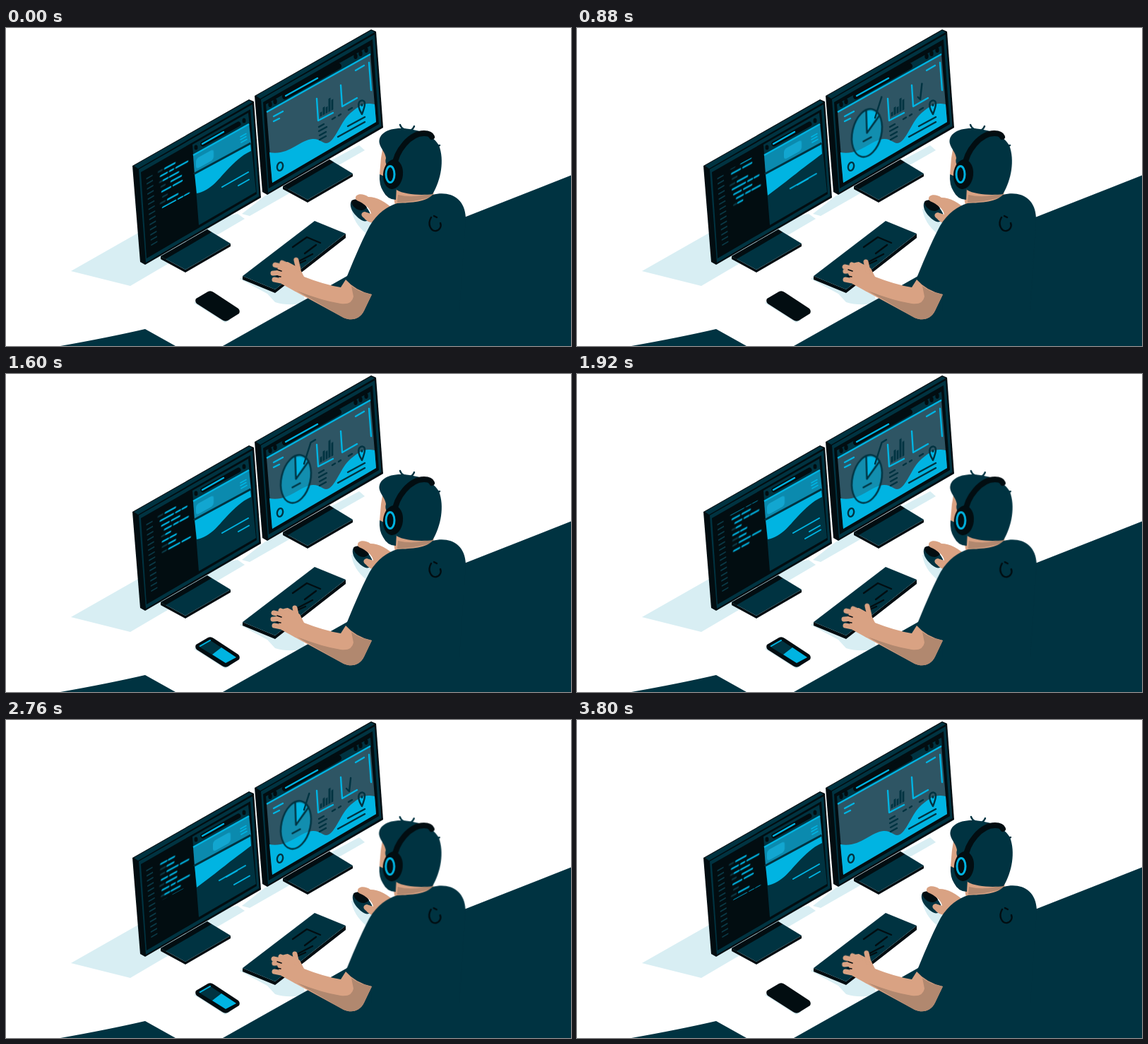
Write an HTML page without scripts that moves like this. It is 800 px wide and 450 px high and loops after 3840 ms.

```html
<!DOCTYPE html>
<html lang="en">
<head>
<meta charset="utf-8">
<title>Developer at a desk</title>
<style>
html, body { margin: 0; width: 100%; height: 100%; overflow: hidden; background: #fff; }
svg { display: block; width: 100vw; height: 100vh; }
svg * { animation: 3840ms linear infinite; }

.ink { fill: #020d11; }
.teal { fill: #003341; }
.cyan { fill: #00b4e2; }
.mid { fill: #0b8aae; }
.slate { fill: #2e5564; }
.shade { fill: #d8eef3; }
.skin { fill: #d9a283; }
.tan { fill: #b1886f; }
.line { fill: none; stroke: #003341; stroke-width: 2.4; stroke-linecap: round; stroke-linejoin: round; }
.line.bright { stroke: #00b4e2; }
.line.black { stroke: #020d11; }
.line.dim { stroke: #0a3a47; }

.code { animation-name: scroll; }
@keyframes scroll { to { transform: translate(-8px, -115px); } }

/* the hero banner runs twice per loop */
.hero, .trace { animation-duration: 1920ms; }
.hero { animation-timing-function: ease-in-out; }
.button { animation-name: button; }
@keyframes button {
  0%, 15%, 77%, 100% { transform: none; }
  40%, 68% { transform: translateX(24px); }
}
.title { animation-name: title; }
@keyframes title {
  0%, 15%, 77%, 100% { transform: none; }
  40% { transform: translate(-4px, 2px); }
  68% { transform: translate(-6px, 4px); }
}
.subtitle { animation-name: subtitle; }
@keyframes subtitle {
  0%, 15%, 77%, 100% { transform: none; }
  40%, 68% { transform: translate(-17px, -1px); }
}
.note { animation-name: note; }
@keyframes note {
  0%, 43%, 84%, 100% { opacity: 0; }
  47%, 80% { opacity: 1; }
}

.trace { stroke-dasharray: 27 70; animation-name: trace; }
@keyframes trace {
  0%, 29% { stroke-dashoffset: 28; }
  45% { stroke-dashoffset: 0; }
  67% { stroke-dashoffset: -27; }
  77% { stroke-dashoffset: -41; }
  84%, 100% { stroke-dashoffset: -48; }
}
.pie { animation-name: pie; animation-timing-function: ease-in-out; }
@keyframes pie {
  0%, 3% { transform: scale(0); }
  14%, 84% { transform: scale(1); }
  88.5% { transform: scale(.5); }
  93%, 100% { transform: scale(0); }
}
.pointer { stroke-dasharray: 40 60; animation-name: pointer; }
@keyframes pointer {
  0%, 12% { stroke-dashoffset: 41; }
  23% { stroke-dashoffset: 9; }
  30%, 66% { stroke-dashoffset: 0; }
  72% { stroke-dashoffset: 16; }
  78%, 100% { stroke-dashoffset: 41; }
}
.bars { transform-origin: 0 367px; animation-name: bars; animation-timing-function: ease-in-out; }
@keyframes bars {
  0%, 27%, 82%, 100% { transform: none; }
  50% { transform: scaleY(1.4); }
  70% { transform: scaleY(1.15); }
}

.phone { animation: phone 3840ms step-end infinite; }
@keyframes phone { 0%, 94% { opacity: 0; } 40% { opacity: 1; } }

.mouse { animation-name: mouse; animation-timing-function: ease-in-out; }
@keyframes mouse {
  0%, 6%, 87%, 100% { transform: translate(-3px, -1px); }
  18%, 74% { transform: none; }
}
.sway { animation-name: sway; animation-timing-function: ease-in-out; }
@keyframes sway {
  0%, 40%, 88%, 100% { transform: none; }
  20% { transform: translateX(-1px); }
  62% { transform: translate(-.5px, .3px); }
}
.tap { animation: tap 480ms ease-in-out infinite; }
.tap.late { animation-delay: -360ms; }
@keyframes tap { 0%, 55%, 100% { transform: none; } 80% { transform: translate(2px, -3px); } }
</style>
</head>
<body>
<svg viewBox="0 0 800 450">
<defs>
  <clipPath id="codeView"><path d="M-8 198H45V256H-8Z"/></clipPath>
  <g id="rows">
    <path class="line dim" d="M-4 201.500h5M-2 217h5M0 224.500h5M2 240h6M-1 247.500h6M4 278h5M5 293.500h6M5 301h5"/>
    <path class="line bright" d="M5 201.500h14M-1 209h9M12 209h5M21 209h16M3 217h6M12 217h12M14 224.500h14M1 232h12M17 232h12M9 247.500h14M2 255h18M24 255h6M33 255h6M4 263h10M18 263h11M8 270.500h9M21 270.500h6M30 270.500h11M10 278h6M5 286h8M16 286h8M14 293.500h9M14 301h15M33 301h11M6 309h8M18 309h9"/>
  </g>
  <g id="stand">
    <path class="ink" d="M219 323L254 342L318 305V309L254 346L219 327Z"/>
    <path class="teal" d="M219 323L285 285L318 305L254 342Z"/>
    <path class="ink" d="M219 323L285 285L291 289L226 327Z"/>
  </g>
  <g id="monitor">
    <path class="ink" d="M179 195L344 101L351 104L361 240L197 335L190 331Z"/>
    <path class="teal" d="M181 195L344 102.500L349 105L187 199Z"/>
    <path class="teal" d="M188 200L349 108L358.500 238L198 332Z"/>
    <path class="ink" d="M191 204L346 115L355 235L199 326Z"/>
  </g>
</defs>

<!-- floor shadows -->
<path class="shade" d="M92 344L187 290L328 263L338 270L176 365Z"/>
<path class="shade" d="M334 263L366 238L500 166L508 173L345 266Z"/>
<path class="shade" d="M331 355L341 348L420 372L424 389Q400 394 381 388L370 376Z"/>
<path class="shade" d="M489 256Q492 278 514 294L526 276L505 254Z"/>
<path class="shade" d="M266 389L310 417L318 413L275 384Z"/>
<path class="teal" d="M77 450Q145 438 197 426L240 450Z"/>
<path class="teal" d="M307 450L490 347L650 267.500L800 208.500V450Z"/>

<!-- left monitor -->
<use href="#stand"/>
<use href="#monitor"/>
<path class="line dim" stroke-dasharray="2 5.500" style="stroke-width:9;stroke-linecap:butt" d="M203 210L210 310" transform="translate(203 0) skewY(-27) translate(-203 0)"/>
<g transform="translate(220 0) skewY(-28.500)" clip-path="url(#codeView)">
  <g class="code"><use href="#rows"/><use href="#rows" x="8" y="115"/></g>
</g>
<path class="teal" d="M264 165L343 120L354 232L273 279Z"/>
<path class="line black" style="stroke-width:7" d="M279 164L329 136"/>
<path class="line bright" d="M278 164L308 147"/>
<g class="ink"><ellipse cx="269" cy="169" rx="2.500" ry="3.500"/><ellipse cx="337" cy="131" rx="2.500" ry="3.500"/></g>
<path class="mid" d="M265 180L344 136L347 164L267 207Z"/>
<path class="line bright" style="stroke-linecap:butt" d="M265 180L344 136"/>
<path class="line bright" style="stroke-width:1.600" d="M332 154l8-4.500M332 158l8-4.500M333 162l8-4.500"/>
<g transform="translate(269 0) skewY(-29)">
  <rect class="hero button" x="0" y="185" width="25" height="15" rx="4" fill="#12a6d0"/>
</g>
<path class="cyan" d="M267 206L346 163L347 174C332 181 324 190 314 200S290 231 270 234Z">
  <animate attributeName="d" dur="1.92s" repeatCount="indefinite" calcMode="spline"
    keyTimes="0;.15;.4;.68;.77;1" keySplines=".4 0 .6 1;.4 0 .6 1;.4 0 .6 1;.4 0 .6 1;.4 0 .6 1"
    values="M267 206L346 163L347 174C332 181 324 190 314 200S290 231 270 234Z;M267 206L346 163L347 174C332 181 324 190 314 200S290 231 270 234Z;M267 206L346 163L347 178C334 188 324 195 314 203S290 222 270 237Z;M267 206L346 163L347 178C334 188 324 195 314 203S290 222 270 237Z;M267 206L346 163L347 174C332 181 324 190 314 200S290 231 270 234Z;M267 206L346 163L347 174C332 181 324 190 314 200S290 231 270 234Z"/>
</path>
<path class="line" style="stroke-width:3;stroke-linecap:butt" d="M266 206.500L346.500 163"/>
<g class="line bright" style="stroke-width:2">
  <path class="hero title" d="M306 225L343 204"/>
  <path class="hero subtitle" d="M329 223L344 214.500"/>
  <path class="note" d="M323 233L345 220.500"/>
</g>

<!-- right monitor -->
<use href="#stand" x="173" y="-99"/>
<use href="#monitor" x="173" y="-99"/>
<path class="teal" d="M368 108L516 25L517 37L369 119Z"/>
<path class="line black" style="stroke-width:8" d="M395 97L471 54"/>
<path class="line bright" d="M396 96L441 71"/>
<g class="ink">
  <ellipse cx="374" cy="108" rx="2.700" ry="4"/><ellipse cx="381" cy="104" rx="2.700" ry="4"/>
  <ellipse cx="495" cy="40" rx="2.700" ry="4"/><ellipse cx="502" cy="36" rx="2.700" ry="4"/><ellipse cx="510" cy="31" rx="2.700" ry="4"/>
</g>
<path class="slate" d="M369 119L516 37L524 133L377 219Z"/>
<path class="cyan" d="M373 176C400 181 415 159 434 157C446 156 449 166 457 162C468 156 474 132 488 120S508 105 522 108L524 133L377 219Z"/>
<path class="line bright" style="stroke-linecap:butt" d="M369 119L516 37"/>
<path class="line bright" d="M379 125L392 118M379 132L387 128M495 60L507 53M514 49L517 88M440 100L442 131L463 120M474 81L476 111L497 99"/>
<path class="line" d="M443 140l7-4M443 146l11-6M444 152l9-5M444 158l9-5M462 129l4-2.500M471 124l3-2M485 116l5-3M484 139L508 126M470 154L508 133"/>
<ellipse class="line" cx="388" cy="196" rx="4" ry="6" transform="rotate(14 388 196)"/>
<path class="line" d="M504 122C499 114 498 109 500 105C503 101 508 102 508 107C508 112 506 117 504 122Z"/>
<ellipse class="teal" cx="504" cy="109" rx="1.500" ry="2"/>
<g transform="translate(446 0) skewY(-29) translate(0 -242)">
  <path class="line bars" style="stroke-linecap:butt;stroke-width:2.800" d="M0 367v-6M4 367v-11M8 367v-9M12 367v-19M16 367v-15"/>
</g>
<path class="line trace" d="M482 97L486 101L488.500 78L491 74L493 78L497 71"/>
<g transform="translate(410.500 148.500)">
  <g class="pie">
    <g transform="rotate(13)">
      <ellipse class="cyan" opacity=".6" rx="20.500" ry="34.500"/>
      <ellipse class="line" rx="20.500" ry="34.500"/>
    </g>
    <path class="cyan" d="M0 0L-1 -30Q8 -34 15 -26Z"/>
    <path class="line" d="M0 0L-1 -32M0 0L18 -25M-5 12L6 6"/>
  </g>
</g>
<path class="line pointer" d="M422 127L431.500 97L438 93"/>

<!-- keyboard and phone -->
<path class="ink" d="M335 351L381 370L481 291V297L381 375L335 356Z"/>
<path class="teal" d="M335 351L437 273L481 291L381 370Z"/>
<path class="line black" d="M406 310L426 296L445 304M423 319L439 307M411 332L434 320M400 340L424 329"/>
<path class="ink" d="M269 383L286 373Q290 371 294 374L329 397Q332 400 330 404L314 414Q310 416 306 413L270 390Q267 387 269 383Z"/>
<g class="phone">
  <path class="teal" d="M272 385L288 376L326 401L311 409Z"/>
  <path class="cyan" d="M305 387L326 401L311 409L292 397Z"/>
  <path class="line bright" style="stroke-width:2" d="M275 385L289 377"/>
</g>

<!-- mouse hand -->
<g class="mouse">
  <path class="teal" d="M492 246C497 240 510 246 518 262C521 272 513 278 505 272C494 264 488 253 492 246Z"/>
  <path class="ink" d="M492 246C497 240 508 245 514 255Q508 262 499 257Q492 252 492 246Z"/>
  <path class="skin" d="M553 259C541 247 528 240 516 240C509 235 499 235 498 241C497 246 505 246 509 250C515 254 519 258 520 264L511 261C505 262 505 267 510 270C515 276 523 279 530 274L540 276Z"/>
</g>

<!-- person -->
<g class="sway">
  <path class="skin" d="M545 218L605 225L606 245L552 257Z"/>
  <path class="tan" d="M555 236Q580 242 605 232L603 239Q580 246 554 247Z"/>
  <path class="teal" d="M480 358C490 335 500 308 515 280C526 262 540 252 554 248C575 247 595 246 604 236C628 230 650 240 651 269L642 400H518V378C503 376 487 367 480 358Z"/>
  <path class="line black" d="M602 268C596 278 602 288 609 287C614 286 617 281 615 276M606 266L610 268"/>
  <path class="skin" d="M533 172L531 184L529 207L545 222L556 185Z"/>
  <path class="teal" d="M529 207Q538 210 553 225L552 243Q540 243 534 231Q528 222 529 207Z"/>
  <path class="teal" d="M529 164C526 151 539 142 559 142C581 143 602 148 613 166C621 187 616 215 604 235C588 237 564 236 553 229L540 196Q536 190 538 184C537 176 531 171 529 164Z"/>
  <path class="line" d="M558 137Q560 143 566 144M578 139Q576 144 572 145M606 167Q611 168 614 166"/>
  <path class="line black" style="stroke-width:8" d="M550 196C552 174 572 149 592 149Q601 149 603 154"/>
  <ellipse class="ink" cx="548" cy="207" rx="14" ry="21" transform="rotate(6 548 207)"/>
  <ellipse class="line bright" style="stroke-width:3" cx="544" cy="207" rx="6" ry="11.500"/>
</g>

<!-- typing arm -->
<path class="skin" d="M405 345L422 352Q450 363 474 367L481 356Q495 372 518 377L507 400C501 412 490 415 478 410L410 373L388 359Z"/>
<path class="tan" d="M412 372Q448 386 474 390Q490 392 492 380L489 365Q500 374 518 377L507 400C501 412 490 415 478 410Z"/>
<path class="skin" d="M383 345Q386 332 399 331L416 340L424 356L410 373L390 362Z"/>
<g fill="none" stroke="#d9a283" stroke-width="7" stroke-linecap="round">
  <path class="tap" d="M378 347L390 346"/>
  <path class="tap late" d="M379 338L392 341"/>
  <path d="M380 356L395 359"/>
  <path class="tap late" d="M389 335L400 340M409 331L412 344"/>
</g>
<path fill="none" stroke="#020d11" stroke-width="1.500" stroke-linecap="round" d="M384 342L390 344M383 351L389 352"/>
</svg>
</body>
</html>
```
